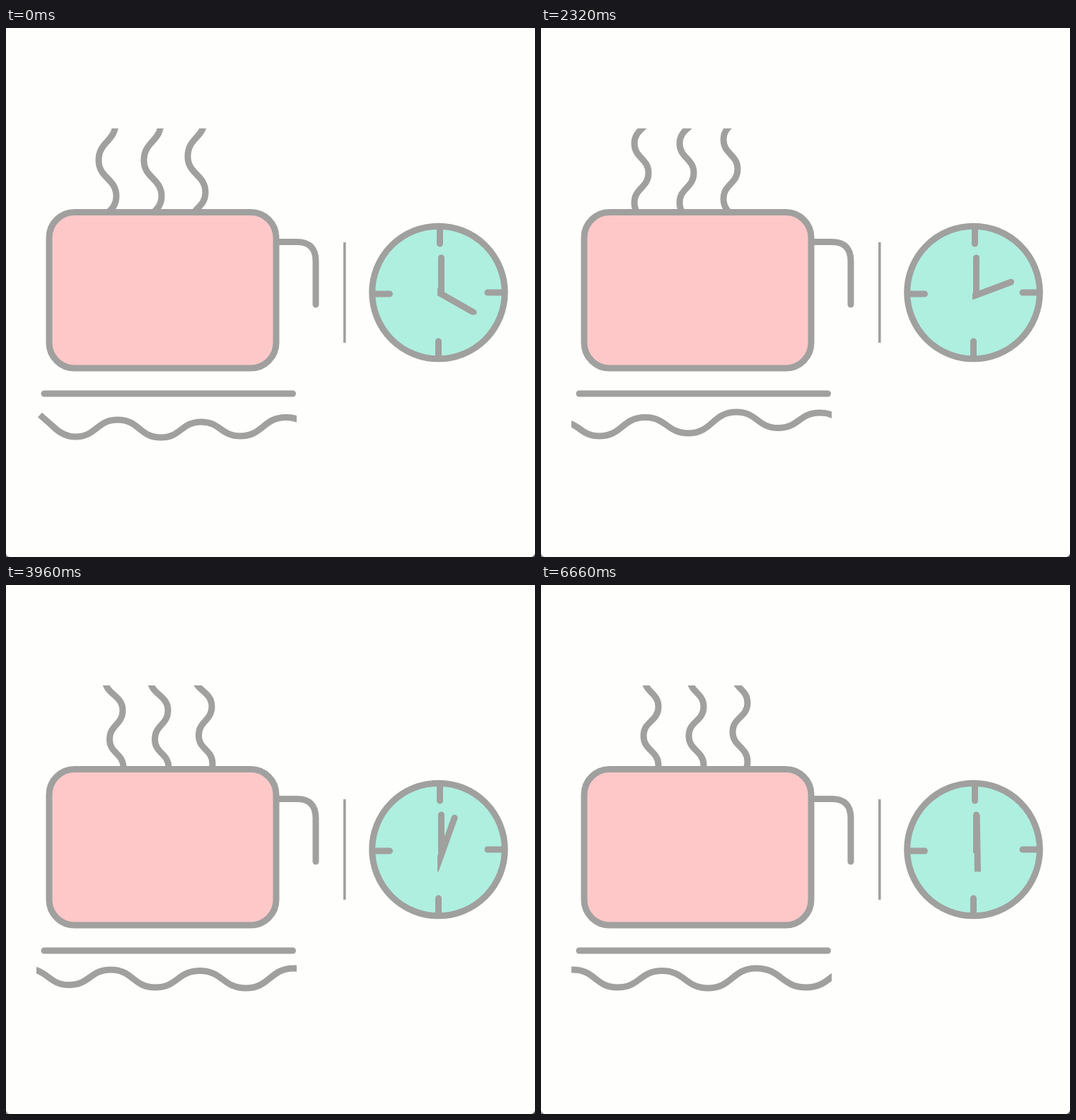
An HTML page that plays this animation: 748 by 748 pixels, repeating every 6.7 s.

```html
<!DOCTYPE html>
<html lang="en">
<head>
<meta charset="utf-8">
<title>Mug and clock</title>
<style>
  html, body { margin: 0; width: 100%; height: 100%; overflow: hidden; background: #fefefd; }
  svg { display: block; width: 100vw; height: 100vh; }
  .line { fill: none; stroke: #a0a09f; stroke-width: 9; }
  .round { stroke-linecap: round; }
</style>
</head>
<body>
<svg viewBox="0 0 748 748">
  <defs>
    <clipPath id="steamBox"><rect x="43" y="142" width="368" height="118"/></clipPath>
    <clipPath id="waveBox"><rect x="43" y="520" width="368" height="80"/></clipPath>
    <clipPath id="handBox"><rect x="610" y="300" width="90" height="105.5"/></clipPath>
    <path id="plume"/>
  </defs>

  <g clip-path="url(#steamBox)">
    <g id="steam" class="line">
      <use href="#plume"/>
      <use href="#plume" x="64"/>
      <use href="#plume" x="126" y="-5.5"/>
    </g>
  </g>

  <path class="line round" d="M382 302.5H411Q438 302.5 438 329.5V391"/>
  <rect class="line" x="61" y="260.5" width="321" height="220.5" rx="36" style="fill:#ffc8c8"/>
  <path class="line round" d="M54 517H405.5"/>
  <g clip-path="url(#waveBox)"><path id="wave" class="line"/></g>
  <path class="line" d="M478.8 303V445" style="stroke-width:3.6"/>

  <circle class="line" cx="611.5" cy="374" r="93.8" style="fill:#afefdf"/>
  <path class="line round" d="M613.5 282V305M523 376H542.5M704 374H681M611.5 466V443"/>
  <path class="line round" d="M615.5 340V325"/>
  <path class="line" d="M615.5 379V325"/>
  <g clip-path="url(#handBox)">
    <path id="hand" class="line round" d="M577 377H667.8"/>
  </g>

  <path d="M0 743Q1 747 5 748H0Z" fill="#8c8c8c"/>
  <path d="M748 743Q747 747 743 748H748Z" fill="#555"/>
</svg>
<script>
const LOOP = 6700, START = 800, LENGTH = 6000, TICK = 20;
const HOLD_FROM = 3000, HOLD_TO = 3180;
const $ = id => document.getElementById(id);

// Turning points of one plume, alternating sides (x, y).
const plume = [
  [155, 134], [131, 187], [156, 238], [134, 283], [155, 328], [132, 371],
  [152, 413], [132, 455], [161, 505], [140, 547], [165, 591], [146.5, 632],
  [166, 672], [145, 713], [166, 755], [145, 797]
];

// Crests and troughs of the wave (x, y).
const wave = [
  [98, 578], [158, 554], [219, 579], [276, 557], [331, 577], [396, 550.5],
  [457, 573], [525, 543], [584, 565.5], [643, 544], [706, 569],
  [769, 545.5], [834, 570], [902, 542], [973, 569], [1040, 543]
];

// Smooth S-curves between turning points, along x or y.
function curve(points, alongX) {
  return points.slice(1).map(([x, y], i) => {
    const [px, py] = points[i];
    const mx = (px + x) / 2, my = (py + y) / 2;
    return alongX ? `C${mx} ${py} ${mx} ${y} ${x} ${y}`
                  : `C${px} ${my} ${x} ${my} ${x} ${y}`;
  }).join("");
}

$("plume").setAttribute("d", `M${plume[0]}` + curve(plume, false));
$("wave").setAttribute("d", "M48 547L66 563C76 573 87 578 98 578" + curve(wave, true));

const bezier = (a, b, u) =>
  3 * a * u * (1 - u) ** 2 + 3 * b * u * u * (1 - u) + u ** 3;

// Same as the CSS "ease" timing function.
function ease(x) {
  let lo = 0, hi = 1;
  for (let i = 0; i < 30; i++) {
    const mid = (lo + hi) / 2;
    if (bezier(0.25, 0.25, mid) < x) lo = mid; else hi = mid;
  }
  return bezier(0.1, 1, lo);
}

function draw(ms) {
  let t = Math.floor((ms % LOOP) / TICK) * TICK;
  if (t > HOLD_FROM && t < HOLD_TO) t = HOLD_FROM;
  const x = Math.min(1, Math.max(0, (t - START) / LENGTH));
  const p = x > 0 ? ease(x) : 0;
  $("steam").setAttribute("transform", `translate(0 ${-500 * p})`);
  $("wave").setAttribute("transform", `translate(${-598 * p} 0)`);
  $("hand").setAttribute("transform", `rotate(${29.6 - 120.6 * p} 617 377)`);
}

const begin = performance.now();
function frame() {
  draw(performance.now() - begin);
  requestAnimationFrame(frame);
}
frame();
</script>
</body>
</html>
```
